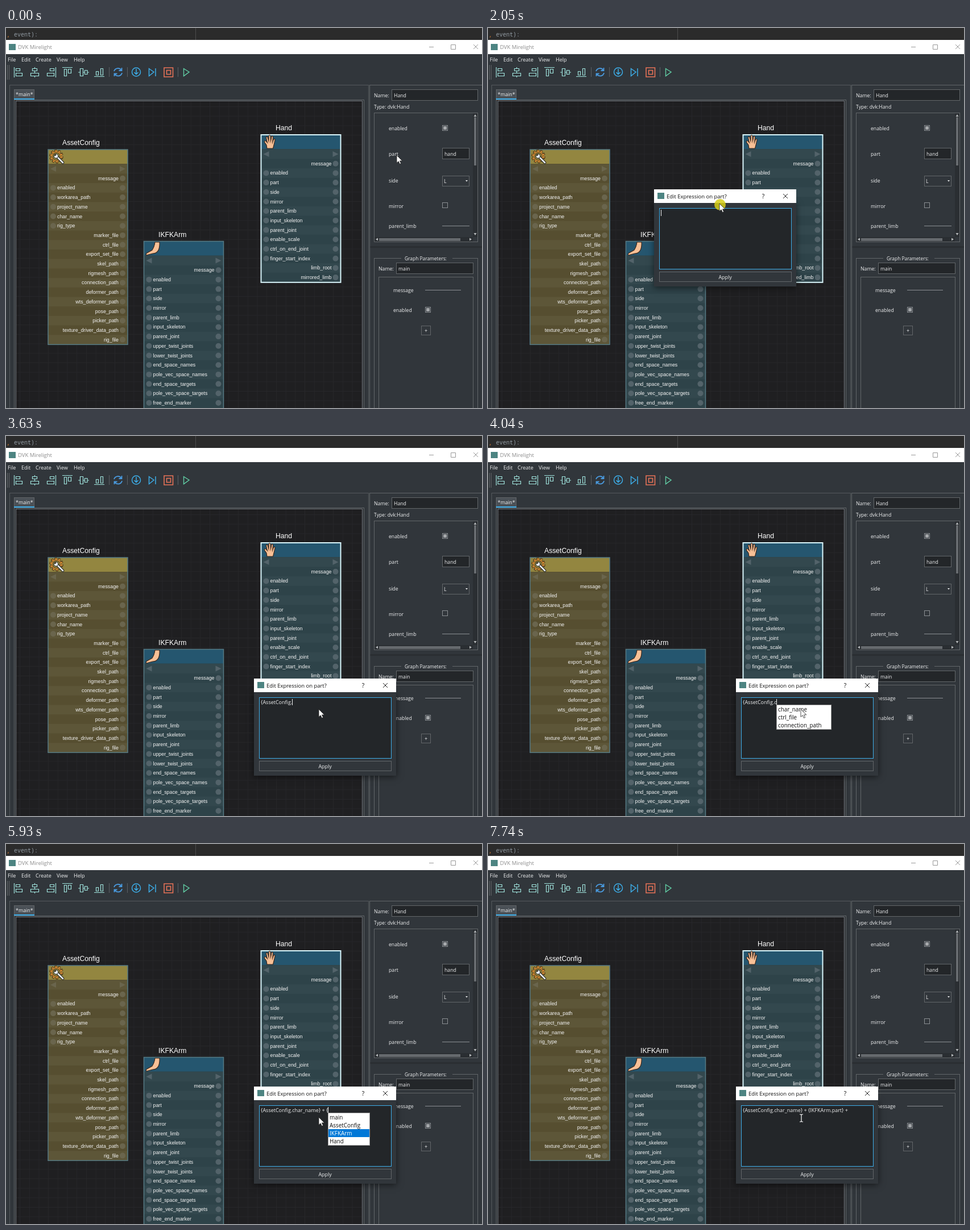
An HTML page with a canvas for the animation above (8000 ms loop, 837 by 669 pixels).

```html
<!DOCTYPE html>
<html lang="en">
<head>
<meta charset="utf-8">
<title>Node graph expression editor</title>
<style>
html, body { margin: 0; width: 100%; height: 100%; overflow: hidden; background: #31363b; }
canvas { display: block; }
</style>
</head>
<body>
<canvas id="stage" width="837" height="669"></canvas>
<script>
const stage = document.getElementById('stage').getContext('2d');
const layer = Object.assign(document.createElement('canvas'), { width: 837, height: 669 }).getContext('2d');
let c = stage;
const UI = '"Open Sans", "Noto Sans", sans-serif';
const ARIAL = '"Liberation Sans", sans-serif';
const MONO = '"Noto Sans Mono", monospace';
const BG = '#31363b', FIELD = '#232629', EDGE = '#626669', INK = '#eff0f1', MINT = '#9fe3dc', BLUE = '#3daee9';
const LOOP = 8000;

function box(x, y, w, h, fill, stroke, lw = 1) {
  if (fill) { c.fillStyle = fill; c.fillRect(x, y, w, h); }
  if (stroke) {
    c.strokeStyle = stroke; c.lineWidth = lw;
    c.strokeRect(x + .5, y + .5, w - 1, h - 1);
  }
}
function text(s, x, y, size = 8.7, color = INK, font = UI, align = 'left') {
  c.font = `${size}px ${font}`; c.fillStyle = color; c.textAlign = align;
  c.fillText(s, x, y);
}
function path(d, stroke, fill, lw = 1.2, x = 0, y = 0) {
  const p = new Path2D(d);
  c.save(); c.translate(x, y);
  if (fill) { c.fillStyle = fill; c.fill(p); }
  if (stroke) { c.strokeStyle = stroke; c.lineWidth = lw; c.stroke(p); }
  c.restore();
}
function dot(x, y, r, fill) {
  c.fillStyle = fill; c.beginPath(); c.arc(x, y, r, 0, 7); c.fill();
}
const hline = (x, y, w, color = EDGE) => box(x, y, w, 1, color);
const vline = (x, y, h, color = EDGE) => box(x, y, 1, h, color);

// ---- nodes ----
const words = s => s.split(' ');
const nodes = {
  AssetConfig: {
    x: 74, y: 214, w: 140, titleX: 99, head: '#938640', body: '#564e30', band: '#5d5638', port: '#6a654d', edge: '#557a84',
    ins: words('enabled workarea_path project_name char_name rig_type'),
    outs: words('marker_file ctrl_file export_set_file skel_path rigmesh_path connection_path deformer_path wts_deformer_path pose_path picker_path texture_driver_data_path rig_file')
  },
  IKFKArm: {
    x: 242.5, y: 375.5, w: 140, titleX: 268, head: '#25566f', body: '#2e4349', band: '#33484e', port: '#53636a', edge: '#557a84',
    ins: words('enabled part side mirror parent_limb input_skeleton parent_joint upper_twist_joints lower_twist_joints end_space_names pole_vec_space_names end_space_targets pole_vec_space_targets free_end_marker'),
    outs: []
  },
  Hand: {
    x: 448.5, y: 188, w: 140, titleX: 474, head: '#25566f', body: '#2e4349', band: '#33484e', port: '#53636a', edge: '#d9f6fb', lw: 2,
    ins: words('enabled part side mirror parent_limb input_skeleton parent_joint enable_scale ctrl_on_end_joint finger_start_index'),
    outs: words('limb_root mirrored_limb')
  }
};
const ROW = 16.7;

function drawNode(name) {
  const n = nodes[name], { x, y, w } = n, right = x + w;
  const rows = ['', 'message', ...n.ins, ...n.outs];
  const h = name === 'IKFKArm' ? 320 : 25 + rows.length * ROW + 1;
  text(name, n.titleX, y - 8, 12.2, '#fff', ARIAL);
  box(x, y, w, h, n.body);
  box(x, y, w, 25, n.head);
  rows.forEach((label, i) => {
    const cy = y + 34 + i * ROW;
    if (i % 2 === 0) box(x, cy - ROW / 2, w, ROW, n.band);
    if (!i) {
      path('M-5 0L5 -5V5Z', 0, n.port, 1, x + 9, cy);
      path('M5 0L-5 -5V5Z', 0, n.port, 1, right - 9, cy);
      return;
    }
    const input = n.ins.includes(label);
    dot(right - 9, cy, 5, n.port);
    if (input) dot(x + 9, cy, 5, n.port);
    text(label, input ? x + 16 : right - 16, cy + 3, 8.85, '#f4f4f4', ARIAL, input ? 'left' : 'right');
  });
  c.strokeStyle = n.edge; c.lineWidth = n.lw || 1.5;
  c.strokeRect(x, y, w, h);
}
function ring(r, lw, color, dash = []) {
  c.setLineDash(dash); c.lineWidth = lw; c.strokeStyle = color;
  c.beginPath(); c.arc(0, 0, r, 0, 7); c.stroke();
}
function drawGear() {
  c.save(); c.translate(88.5, 226);
  ring(10.2, 4, '#3b2b17', [4, 2.4]);
  ring(8, 3.6, '#3b2b17');
  ring(10, 2.4, '#cf8b35', [2.9, 3.5]);
  ring(8, 1.9, '#cf8b35');
  c.restore();
  c.lineCap = 'round';
  path('M89 226L100 237', '#222', 0, 4.6);
  path('M89 226L100 237', '#e8eef0', 0, 2.6);
  c.lineCap = 'butt';
  dot(88, 225.5, 4.2, '#222');
  dot(88, 225.5, 3.2, '#e8eef0');
  dot(86.5, 223.5, 1.8, '#4b4530');
}
function drawLimbIcons() {
  path('M459 212L458 206L454.5 201Q454 198 457 199L459.500 202L457.500 193Q458 190 460 192L462 199L462 190Q463.500 187 465 190L465.500 199L467 191Q469 189 469.500 192L468.800 201L470.500 196Q473 194 473 197L471 206L469.500 212Z', '#3a2418', '#f8c096', 1.1);
  path('M262 377L270 377Q270.500 386 268 391Q265 397 258 397L247 400Q245 398 248 396L257 391Q261 385 262 377Z', '#3a2418', '#f8c096', 1.1);
}

// ---- window chrome ----
const appIcon = (x, y) => box(x, y, 12, 11, '#4d8482');

function drawToolbar() {
  vline(2, 65, 26); vline(5, 65, 26);
  const marks = [
    'M14.500 69V87M17.500 71.500H24.500V75.500H17.500ZM17.500 79.500H28.500V84.500H17.500Z',
    'M50.500 69V71M50.500 75V79M50.500 84V87M46.500 71.500H54.500V75.500H46.500ZM43.500 79.500H57.500V84.500H43.500Z',
    'M87.500 69V87M77.500 71.500H84.500V75.500H77.500ZM72.500 79.500H84.500V84.500H72.500Z',
    'M99 69.500H117M102.500 72.500H106.500V84.500H102.500ZM109.500 72.500H114.500V79.500H109.500Z',
    'M127 78H130M135 78H138M143 78H146M130.500 71.500H135.500V84.500H130.500ZM138.500 74.500H143V81.500H138.500Z',
    'M155 85.500H173M158.500 76.500H162.500V83H158.500ZM166.500 71.500H170.500V83H166.500Z'
  ];
  marks.forEach(d => path(d, MINT));
  [181, 213, 302].forEach(x => vline(x, 69, 17, '#5b6065'));
  path('M190 76A7 7 0 0 1 202.500 74M203.500 70V75H198.500M204 79A7 7 0 0 1 191.500 81.500M190.500 85V80.500H195.500', '#4a9be0', 0, 1.8);
  path('M236.500 77.500A7.500 7.500 0 1 1 221.500 77.500A7.500 7.500 0 1 1 236.500 77.500M229 72V81M225.500 78L229 81.500L232.500 78', BLUE, 0, 1.5);
  path('M251.500 71.500L260 77.500L251.500 84.500ZM263 71V85', BLUE, 0, 1.5);
  path('M278 70H293.500V86H278ZM282.500 74.500H289.500V81.500H282.500Z', '#e87358', 0, 1.6);
  path('M312.500 71.500L322 77.500L312.500 84.500Z', '#62cfa6', 0, 1.4);
}
function drawFrame() {
  box(0, 0, 837, 669, BG);
  box(0, 0, 837, 21, '#2b2b2b');
  vline(333, 0, 21, '#4d4d4d');
  text(',', 1, 15, 10, '#cc7832', MONO);
  text('event):', 14, 15, 10, '#929ba3', MONO);
  box(0, 21, 837, 25, '#fff');
  appIcon(5, 28);
  text('DVK Mirelight', 21, 37, 9.5, '#8c8c8c');
  path('M744 33.500H752M782.500 29.500H790.500V37.500H782.500ZM822 29L830 37M830 29L822 37', '#999', 0, 1);
  [['File', 3], ['Edit', 27], ['Create', 52], ['View', 89], ['Help', 119]].forEach(([s, x]) => text(s, x, 58.5, 9.1));
  drawToolbar();
  box(6, 100, 632, 600, 0, '#55595d');
  box(14, 108, 36, 17, '#4a5056', EDGE);
  box(14, 124, 36, 2, BLUE);
  text('*main*', 17, 120, 8.9);
  box(14, 126, 616, 600, '#2c3034', EDGE);
  box(17, 128, 610, 600, '#1f1f21', '#70757a');
}
function drawGraph() {
  c.save();
  c.beginPath(); c.rect(18, 129, 608, 540); c.clip();
  for (let x = 24; x < 627; x += ROW) box(x, 129, 1, 540, '#27272a');
  for (let y = 138; y < 669; y += ROW) box(18, y, 608, 1, '#27272a');
  Object.keys(nodes).forEach(drawNode);
  drawGear();
  drawLimbIcons();
  c.restore();
}
function check(x, y, on) {
  box(x, y, 10, 10, 0, '#8b8f93');
  if (on) box(x + 2, y + 2, 6, 6, '#a3a6a9');
}
function field(s, x, y, w, h) {
  box(x, y, w, h, FIELD, EDGE);
  text(s, x + 4, y + h / 2 + 3.5);
}
function drawPanel() {
  vline(639, 100, 569); hline(639, 100, 198);
  text('Name:', 647, 122);
  field('Hand', 678, 108, 152, 20);
  text('Type: dvk:Hand', 647, 142);
  box(647, 149, 183, 228, 0, EDGE);
  ['enabled', 'part', 'side', 'mirror', 'parent_limb'].forEach((s, i) => text(s, 673, [180, 225, 272, 317, 352][i]));
  check(767, 171, true);
  field('hand', 767, 211, 48, 20);
  box(767, 260, 48, 19, BG, EDGE);
  text('L', 770, 273);
  path('M808 268H812L810 270.500Z', 0, INK);
  check(767, 307, false);
  hline(767, 348, 48, '#8b8f93');
  box(821, 150, 8, 218, '#2a2e32');
  box(648, 368, 173, 8, '#2a2e32');
  box(823, 157, 4, 85, '#666a6e');
  box(656, 370, 143, 5, '#666a6e');
  path('M822.500 156L825 152L827.500 156ZM822.500 361L825 365L827.500 361ZM654 369.500L650 372L654 374.500ZM815 369.500L819 372L815 374.500Z', 0, '#b5b8ba');
  box(640, 384, 197, 3, '#2a2e32');
  hline(647, 405, 48); hline(785, 405, 45);
  vline(647, 405, 264); vline(829, 405, 264);
  text('Graph Parameters:', 701, 408.500, 8.4);
  text('Name:', 655, 427);
  field('main', 686, 413, 136, 20);
  box(655, 438, 167, 260, 0, EDGE);
  text('message', 681, 465);
  hline(737, 461, 63, '#8b8f93');
  text('enabled', 681, 500);
  check(737, 491, true);
  box(730, 524, 17, 17, 0, EDGE);
  text('+', 738.5, 536, 9, INK, UI, 'center');
}

// ---- motion ----
const clamp = v => Math.max(0, Math.min(1, v));
const smooth = v => v * v * (3 - 2 * v);
const mix = (a, b, k) => a + (b - a) * k;

// time, x, y of the pointer tip
const route = [[0, 687, 224], [540, 687, 224], [650, 700, 234], [900, 700, 234], [930, 702, 235], [1260, 702, 235],
  [1870, 407, 309], [2070, 407, 309], [2560, 551, 453], [2610, 551, 453], [2690, 550, 481]];
function pointer(t) {
  const i = route.findIndex(p => p[0] > t);
  if (i < 0) return route.at(-1).slice(1);
  const [a, b] = [route[i - 1], route[i]], k = smooth((t - a[0]) / (b[0] - a[0]));
  return [mix(a[1], b[1], k), mix(a[2], b[2], k)];
}

const members = name => ['message', ...nodes[name].ins, ...nodes[name].outs];
const lists = { top: ['main', ...Object.keys(nodes)], asset: members('AssetConfig'), arm: members('IKFKArm') };
const A = '{AssetConfig', B = A + '.char_name} + {', C = B + 'IKFKArm';
// time, text (| is the caret), suggestion list, chosen row, arrow pointer
const typing = [
  [0, '|'], [2880, '{|', 'top', -1, 1], [3080, '{A|', 'top', -1, 1], [3420, '{A|', 'top', 0, 1], [3490, A + '|'],
  [3630, A + '.|', '', 0, 1], [3700, A + '.|', 'asset', -1, 1], [3970, A + '.c|', 'asset', -1, 1],
  [4170, A + '.ch|', 'asset', -1, 1], [4310, A + '.ch|', 'asset', 0, 1], [4510, A + '.char_name|'],
  [4780, A + '.char_name'], [4850, A + '.char_name}|'], [4980, A + '.char_name}'],
  [5120, A + '.char_name} +|'], [5250, A + '.char_name} + |'],
  [5520, B + '|', '', 0, 1], [5590, B + '|', 'top', -1, 1], [5790, B + '|', 'top', 0, 1], [5860, B + '|', 'top', 1, 1],
  [5930, B + '|', 'top', 2, 1], [6070, C + '|'], [6130, C + '.|', '', 0, 1], [6200, C + '.|', 'arm', -1, 1],
  [6470, C + '.p|', 'arm', -1, 1], [6600, C + '.pa|', 'arm', -1, 1], [6800, C + '.pa|', 'arm', 0, 1],
  [6930, C + '.part|'], [7130, C + '.part'], [7270, C + '.part}|'], [7340, C + '.part} |'],
  [7470, C + '.part} +|'], [7540, C + '.part} + |'], [7740, C + '.part} + ']
];

function drawPopup(items, sel, x, y) {
  c.font = `9.9px ${UI}`;
  const w = Math.round(Math.max(...items.map(s => c.measureText(s).width)) + 20);
  const shown = items.slice(0, 7), h = shown.length * 14 + 2;
  box(x, y, w, h, '#fff', '#9a9a9a');
  shown.forEach((s, i) => {
    if (i === sel) box(x + 1, y + 1 + i * 14, w - 2, 14, '#0078d7');
    text(s, x + 3, y + 12 + i * 14, 9.9, i === sel ? '#fff' : '#111');
  });
  if (items.length > 7) {
    box(x + w - 12, y + 1, 11, h - 2, '#f0f0f0');
    box(x + w - 12, y + 12, 11, (h - 24) * 7 / items.length, '#cdcdcd');
    path('M-3 2L0 -1L3 2', '#555', 0, 1, x + w - 6.5, y + 6);
    path('M-3 -2L0 1L3 -2', '#555', 0, 1, x + w - 6.5, y + h - 6);
  }
}
function drawDialog(t, [, raw, list, sel]) {
  const show = clamp((t - 1045) / 245), k = smooth(clamp((t - 2070) / 490));
  const x = Math.round(mix(291.5, 436, k)), y = Math.round(mix(284, 427, k)), s = .9 + .1 * show;
  // composed apart so that it fades as one sheet
  c = layer;
  c.clearRect(0, 0, 837, 669);
  c.save();
  c.translate(x + 125, y + 85); c.scale(s, s); c.translate(-125, -85);
  c.shadowColor = 'rgba(0,0,0,.55)'; c.shadowBlur = 11; c.shadowOffsetY = 2;
  box(0, 24, 250, 147, BG);
  c.shadowColor = 'transparent';
  box(0, 0, 250, 24, '#fff');
  appIcon(6, 6);
  text('Edit Expression on part?', 22, 15.5, 9.45, '#111');
  text('?', 192, 16, 10.5, '#111', UI, 'center');
  path('M227 8L235 16M235 8L227 16', '#222', 0, 1);
  box(9, 33, 233, 108, FIELD, BLUE);
  box(9, 145, 233, 18, BG, EDGE);
  text('Apply', 125, 157.5, 8.9, INK, UI, 'center');
  const str = raw.replace('|', '');
  text(str, 12, 45, 9);
  const end = Math.round(12 + c.measureText(str).width);
  if (raw.endsWith('|')) vline(end, 36, 11, INK);
  if (list) {
    const prefix = str.split(/[{.]/).pop();
    drawPopup(lists[list].filter(n => n.startsWith(prefix)), sel, end, 46);
  }
  c.restore();
  c = stage;
  c.globalAlpha = show * show;
  c.drawImage(layer.canvas, 0, 0);
  c.globalAlpha = 1;
}
function drawMenu(t) {
  const hot = t >= 560;
  box(687, 224, 103, 25, BG, EDGE);
  if (hot) box(689, 226, 99, 21, BLUE);
  text('Edit Expression', 706, 240, 8.9);
}
function drawPointer(t, arrow) {
  const [x, y] = pointer(t);
  if (t >= 1960 && t < 2600) dot(x + 1, y + 2, 10, 'rgba(214,206,22,.85)');
  if (arrow) path('M0 0V13.500L3.200 10.800L5.400 15.500L7.600 14.500L5.500 9.900H9.800Z', '#222', '#fff', .8, x, y);
  else path('M-3 -6H-1L0 -5L1 -6H3M0 -5V6M-3 7H-1L0 6L1 7H3', '#fff', 0, 1.2, 551, 482);
}
function draw(now) {
  const t = now % LOOP, step = typing.findLast(s => s[0] <= t);
  drawFrame();
  drawGraph();
  drawPanel();
  if (t >= 190 && t < 1140) drawMenu(t);
  if (t >= 1140) drawDialog(t, step);
  drawPointer(t, t < 2680 || step[4]);
}
const start = performance.now();
function tick() {
  draw(performance.now() - start);
  requestAnimationFrame(tick);
}
tick();
</script>
</body>
</html>
```
